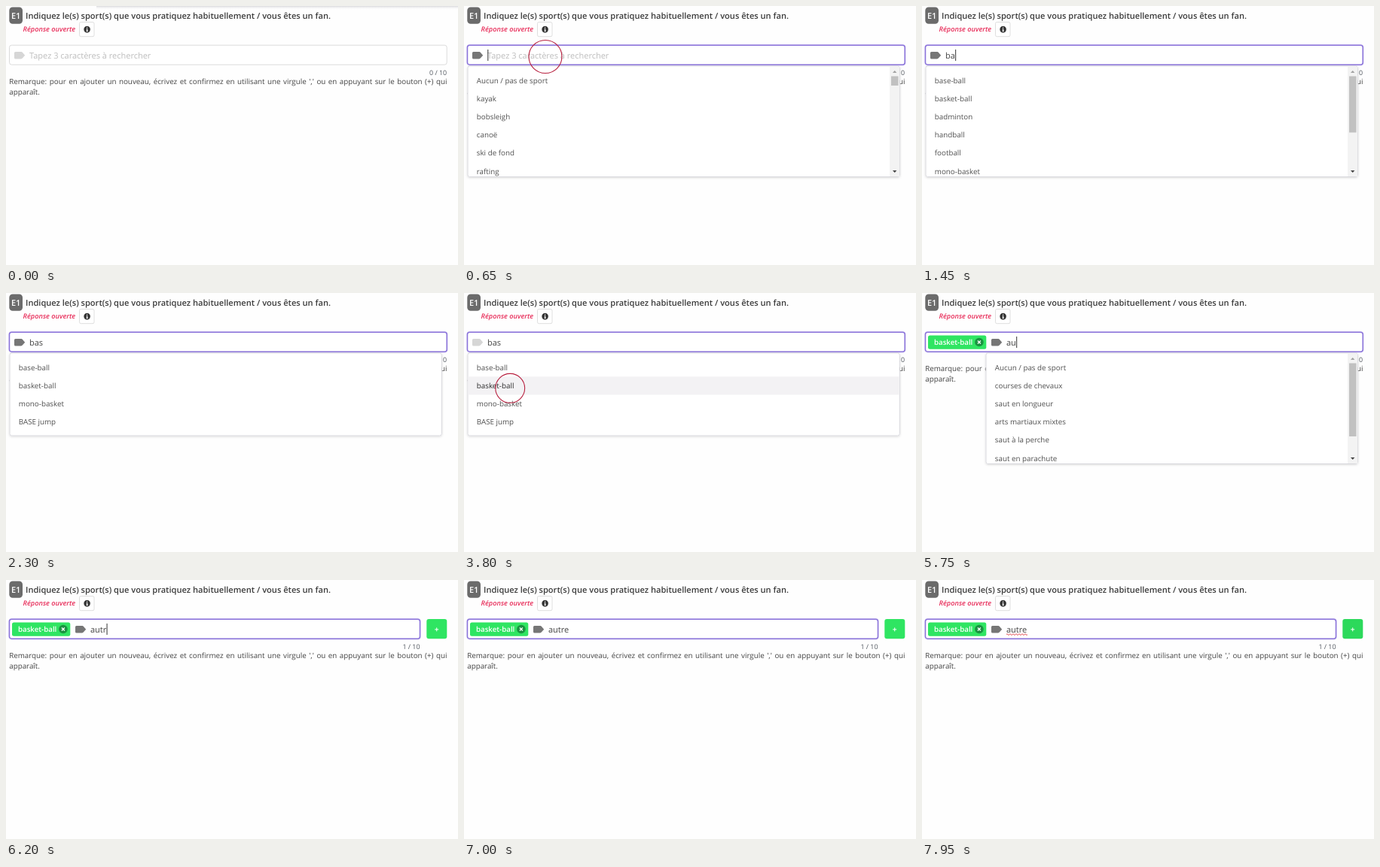
Write an HTML page that moves like this. It is 600 px wide and 345 px high and loops after 8000 ms.

```html
<!DOCTYPE html>
<html lang="fr">
<head>
<meta charset="utf-8">
<style>
html, body { margin: 0; width: 100%; height: 100%; overflow: hidden; background: #fefefe; }
body { position: relative; font-family: "Open Sans", "Noto Sans", sans-serif; text-rendering: geometricPrecision; }
#note { position: absolute; left: 4.2px; top: 93.6px; width: 581.3px; margin: 0; font-size: 9.8px; line-height: 14.2px; text-align: justify; color: #444; }
svg { position: absolute; left: 0; top: 0; }
text { white-space: pre; }
.option { font-size: 9.8px; fill: #505050; }
.entry { font-size: 11px; }
</style>
</head>
<body>
<p id="note">Remarque: pour en ajouter un nouveau, écrivez et confirmez en utilisant une virgule ',' ou en appuyant sur le bouton (+) qui apparaît.</p>
<svg width="600" height="345" viewBox="0 0 600 345">
  <defs>
    <linearGradient id="fade" x2="0" y2="1">
      <stop stop-color="#d9d9dc"/><stop offset="1" stop-color="#fefefe" stop-opacity="0"/>
    </linearGradient>
    <filter id="shade" x="-5%" y="-5%" width="110%" height="115%">
      <feDropShadow dx="0" dy="1" stdDeviation="1.5" flood-color="#000" flood-opacity=".14"/>
    </filter>
    <clipPath id="clip"><rect id="clipBox" x="5" y="80" width="573" height="147"/></clipPath>
  </defs>

  <rect id="top" x="120" width="480" height="5" fill="url(#fade)"/>
  <rect x="4.3" y="1.5" width="17.7" height="22.3" rx="4.5" fill="#6b6b6b"/>
  <text x="13.1" y="17" text-anchor="middle" font-size="11" font-weight="600" fill="#fff">E1</text>
  <text x="26" y="17" font-size="11.09" font-weight="600" fill="#3c3c3c">Indiquez le(s) sport(s) que vous pratiquez habituellement / vous êtes un fan.</text>
  <text x="22.6" y="34.4" font-size="9.2" font-weight="600" font-style="italic" fill="#e8305c">Réponse ouverte</text>
  <rect x="97.5" y="21.5" width="19.5" height="19.2" rx="2" fill="#fff" stroke="#dedede"/>
  <circle cx="107.6" cy="31.1" r="4.3" fill="#333"/>
  <path d="M107.6 28.3v1.3M106.7 30.7h1v2.6M106.5 33.4h2.3" fill="none" stroke="#fff" stroke-width="1.1"/>

  <rect id="glow" x="4.5" y="52.2" width="581" height="26" rx="3" fill="none" stroke="#8a73da" stroke-width="3"/>
  <rect id="field" x="4.5" y="52.2" width="581" height="26" rx="3" fill="#fff"/>
  <g id="chip">
    <rect x="8" y="56.6" width="77.3" height="18.2" rx="2.5" fill="#2fe562"/>
    <text x="16" y="69" font-size="9.7" font-weight="600" fill="#fff">basket-ball</text>
    <circle cx="75.9" cy="65.5" r="5.8" fill="#1a9340"/>
    <path d="M73.9 63.5l4 4m0-4l-4 4" stroke="#fff" stroke-width="1.3"/>
  </g>
  <path id="label" d="M12.5 61h7.7q1 0 1.6.8l3.4 3.9-3.4 3.9q-.6.8-1.6.8h-7.7q-1.5 0-1.5-1.5v-6.4q0-1.5 1.5-1.5z"/>
  <text id="hint" class="entry" x="31" y="69.8" fill="#bdbdbd">Tapez 3 caractères à rechercher</text>
  <text id="entry" class="entry" y="69.8" fill="#444"></text>
  <path id="wave" fill="none" stroke="#e0393e" stroke-width=".9"/>
  <rect id="caret" y="58" width="1" height="15" fill="#333"/>
  <text id="count" y="91.8" font-size="8.9" text-anchor="end" fill="#50565e"></text>

  <g id="plus">
    <rect id="plusBox" x="558.3" y="52" width="27" height="26.3" rx="3"/>
    <path d="M569.2 65.9h5M571.7 63.4v5" stroke="#fff"/>
  </g>

  <g id="menu">
    <rect id="panel" y="80" rx="2.5" fill="#fff" stroke="#d9d9de" filter="url(#shade)"/>
    <g clip-path="url(#clip)">
      <rect id="hover" height="24.2" fill="#f3f2f4"/>
      <g id="rows"></g>
    </g>
    <g id="bar">
      <rect x="565" y="81" width="13" height="146" fill="#f3f3f3"/>
      <path d="M569 89l2.7-3 2.7 3z" fill="#a0a0a0"/>
      <path d="M569 219l2.7 3 2.7-3z" fill="#444"/>
      <rect id="thumb" x="567" y="93.5" width="9.5" fill="#c1c1c1"/>
    </g>
  </g>
  <circle id="ring" fill="none" stroke="#b8203f" stroke-width="1.1"/>
</svg>

<script>
const LOOP = 8000, ROW = 24.15, BLINK = 530;
const $ = id => document.getElementById(id);
const set = (id, attrs) => { for (const k in attrs) $(id).setAttribute(k, attrs[k]); };
const show = (id, on) => $(id).style.display = on ? "" : "none";
const clamp = v => Math.max(0, Math.min(1, v));
const ramp = (t, from, span) => clamp((t - from) / span);
const mix = (a, b, p) => "rgb(" + a.map((v, i) => Math.round(v + (b[i] - v) * p)) + ")";

const lists = {
  all: ["Aucun / pas de sport", "kayak", "bobsleigh", "canoë", "ski de fond", "rafting"],
  b: ["bobsleigh", "base-ball", "basket-ball", "badminton", "handball", "football"],
  ba: ["base-ball", "basket-ball", "badminton", "handball", "football", "mono-basket"],
  bas: ["base-ball", "basket-ball", "mono-basket", "BASE jump"],
  a: ["Aucun / pas de sport", "kayak", "canoë", "rafting", "base-ball", "handball"],
  au: ["Aucun / pas de sport", "courses de chevaux", "saut en longueur", "arts martiaux mixtes", "saut à la perche", "saut en parachute"],
  aut: ["saut en longueur", "saut à la perche", "saut en parachute", "saut à ski"]
};

// time, typed text, open list, scroll thumb height
const steps = [
  [0, "", "", 0],
  [450, "", "all", 12.5],
  [1150, "b", "b", 40],
  [1350, "ba", "ba", 75],
  [1600, "bas", "bas", 0],
  [4150, "", "", 0],
  [5250, "a", "a", 20],
  [5550, "au", "au", 97.5],
  [5900, "aut", "aut", 0],
  [6150, "autr", "", 0],
  [6400, "autre", "", 0]
];
const FOCUS = 400, PICK = 3600, ADDED = 4150, READY = 6150, LEAVE = 7700;
const clicks = [[FOCUS, 108, 67.5], [PICK, 61.2, 126.8]];

let shown = null;
function fillRows(name, x) {
  const key = name + x;
  if (key === shown) return;
  shown = key;
  $("rows").replaceChildren(...(lists[name] || []).map((label, i) => {
    const el = document.createElementNS("http://www.w3.org/2000/svg", "text");
    el.setAttribute("class", "option");
    el.setAttribute("x", x + 11.8);
    el.setAttribute("y", 102.8 + i * ROW);
    el.textContent = label;
    return el;
  }));
}

function drawMenu(t, name, thumb, left) {
  show("menu", name);
  fillRows(name, left);
  if (!name) return;
  const box = { x: left, width: 578.3 - left, height: thumb ? 147.5 : 110 };
  set("panel", box);
  set("clipBox", box);
  show("bar", thumb);
  set("thumb", { height: thumb });
  const row = name === "bas" && t >= 2900 ? (t < 3150 ? 0 : 1) : -1;
  show("hover", row >= 0);
  set("hover", { x: left + .5, width: 577.3 - left, y: 87.2 + row * ROW });
  [...$("rows").children].forEach((el, i) => el.style.fill = i === row ? "#2b2b2b" : "");
}

function draw(t) {
  const [since, typed, list, thumb] = steps.filter(s => s[0] <= t).pop();
  const added = t >= ADDED, ready = t >= READY;
  const focus = ramp(t, FOCUS, 150);
  const right = ready ? 549.5 : 585.2;

  set("top", { opacity: 1 - ramp(t, 50, 350) });
  set("field", { width: right - 4.5, stroke: mix([219, 219, 219], [138, 115, 218], focus), "stroke-width": 1 + .5 * focus });
  set("glow", { width: right - 4.5, opacity: .2 * focus });
  const dim = ramp(t, PICK, 150) - ramp(t, ADDED, 150);
  set("label", { fill: mix([214, 214, 214], [118, 118, 118], focus - dim), transform: `translate(${added ? 81 : 0} 0)` });
  show("chip", added);

  const x = added ? 112 : 31;
  show("hint", !typed && !added);
  set("entry", { x });
  $("entry").textContent = typed;
  const end = typed ? $("entry").getComputedTextLength() : 0;
  const active = t >= FOCUS && !(t >= PICK && t < ADDED) && t < LEAVE;
  const lit = Math.floor((t - Math.max(since, FOCUS)) / BLINK) % 2 === 0;
  show("caret", active && lit);
  set("caret", { x: x + end + .3 });

  show("wave", t >= LEAVE);
  set("wave", { d: "M112 72.6" + "q1 -1.8 2 0t2 0".repeat(7) });

  set("count", { x: right });
  $("count").textContent = (added ? 1 : 0) + " / 10";
  show("plus", ready);
  set("plusBox", { fill: mix([47, 229, 98], [44, 217, 91], ramp(t, LEAVE, 150)) });
  drawMenu(t, list, thumb, added ? 85 : 5);

  const click = clicks.find(c => t >= c[0] && t < c[0] + 350);
  show("ring", click);
  if (click) set("ring", { cx: click[1], cy: click[2], r: 9.4 + (t - click[0]) * .05 });
}

const start = performance.now();
function tick() {
  draw((performance.now() - start) % LOOP);
  requestAnimationFrame(tick);
}
tick();
</script>
</body>
</html>
```
